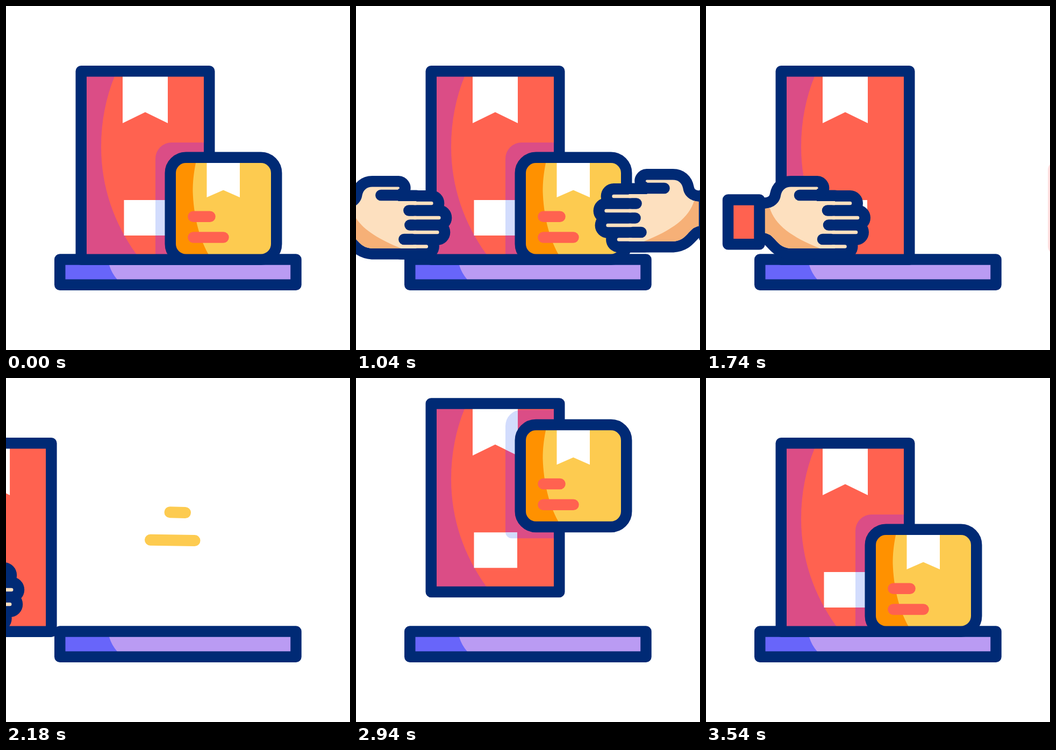
These frames come from a looping animation (640x640 px, 3600 ms). An HTML page with a canvas:

```html
<!DOCTYPE html>
<html lang="en">
<head>
<meta charset="utf-8">
<title>Parcels</title>
<style>
  html, body { margin: 0; width: 100%; height: 100%; overflow: hidden; background: #fff; }
  canvas { display: block; width: 100vw; height: 100vh; }
</style>
</head>
<body>
<canvas id="stage" width="640" height="640"></canvas>
<script>
const ctx = document.getElementById('stage').getContext('2d');
const LOOP = 3600;
const LINE = 20.5;
const C = {
  navy: '#002a75', red: '#ff6250', magenta: '#db4d86', yellow: '#fdcb50', orange: '#ff9100',
  blue: '#6865fa', lilac: '#ba9bf3', skin: '#fde0bf', tan: '#f6b077', mist: '#d2dcfd', white: '#fff'
};

const clamp = v => Math.min(1, Math.max(0, v));
const progress = (t, start, end) => clamp((t - start) / (end - start));
const smooth = (t, start, end) => {
  const u = progress(t, start, end);
  return u * u * (3 - 2 * u);
};
const dropHeight = (t, start, end) => 482 * Math.pow(1 - progress(t, start, end), 3.4);

function fill(path, color) {
  ctx.fillStyle = color;
  ctx.fill(path);
}

function stroke(path, color, width = LINE) {
  ctx.strokeStyle = color;
  ctx.lineWidth = width;
  ctx.stroke(path);
}

function bar(x1, y1, x2, y2, color, width = LINE) {
  const p = new Path2D();
  p.moveTo(x1, y1);
  p.lineTo(x2, y2);
  stroke(p, color, width);
}

function frame(x, y, w, h, r = 0) {
  const p = new Path2D();
  if (r) p.roundRect(x, y, w, h, r);
  else p.rect(x, y, w, h);
  return p;
}

function at(x, y, draw) {
  ctx.save();
  ctx.translate(x, y);
  draw();
  ctx.restore();
}

function clipped(path, draw) {
  ctx.save();
  ctx.clip(path);
  draw();
  ctx.restore();
}

const tall = {
  body: frame(139.75, 121.25, 238.5, 350.5),
  shade: new Path2D('M140 121H206L202 131C186 170 177 214 177 262C177 336 201 404 242 461L250 472H140Z'),
  paper: new Path2D('M217 125H301V218L259 197.5L217 218ZM219.5 361H300V427H219.5Z')
};
const small = {
  body: frame(305.75, 281.75, 197.5, 190, 29),
  shade: new Path2D('M306 282H355L353 292C349 312 347.5 328 347.5 345C349 388 358 428 376 461L382 472H306Z'),
  ribbon: new Path2D('M373.5 286H435V356L404.3 342.5L373.5 356Z'),
  shadow: frame(278, 254, 250, 239, [30, 30, 12, 12])
};
const shelf = {
  body: frame(100.25, 471.5, 439.25, 47.25),
  shade: new Path2D('M100 472H190L192 482C195 492 200 501 207 509L212 518H100Z')
};
const hand = {
  palm: new Path2D('M109 377C126 376 137 366 139 353C141 342 148 336.5 158 336.5H207Q211 339 206 341V363H240V451H158C140 450 134 440 126 432Q119 424 109 422Z'),
  shade: new Path2D('M100 368L118 374C128 408 160 430 212 451V460H100Z'),
  cuff: frame(41, 360.5, 58.5, 82.75),
  fingers: [[268, 367], [282, 394], [279, 421], [258.5, 447.5]],
  gaps: [[174, 352, 212], [226, 380.5, 265], [228, 407.5, 275], [217, 434, 260]]
};

function drawTall(shadowX, shadowY, hasShadow) {
  const castShadow = color => {
    if (hasShadow) at(shadowX, shadowY, () => fill(small.shadow, color));
  };
  fill(tall.body, C.red);
  clipped(tall.body, () => {
    fill(tall.shade, C.magenta);
    castShadow(C.magenta);
    fill(tall.paper, C.white);
    clipped(tall.paper, () => castShadow(C.mist));
  });
  stroke(tall.body, C.navy);
}

function drawSmall() {
  fill(small.body, C.yellow);
  clipped(small.body, () => {
    fill(small.shade, C.orange);
    fill(small.ribbon, C.white);
  });
  bar(348.5, 391.75, 379.5, 391.75, C.red);
  bar(348.5, 430.5, 404.5, 430.5, C.red);
  stroke(small.body, C.navy);
}

function drawShelf() {
  fill(shelf.body, C.lilac);
  fill(shelf.shade, C.blue);
  stroke(shelf.body, C.navy);
}

function drawHand() {
  stroke(hand.palm, C.navy, LINE * 2);
  for (const [x, y] of hand.fingers) bar(210, y, x, y, C.navy, 48);
  fill(hand.palm, C.skin);
  clipped(hand.palm, () => fill(hand.shade, C.tan));
  for (const [x, y, end] of hand.gaps) bar(x, y, end, y, C.navy);
  for (const [x, y] of hand.fingers) bar(236, y, x, y, C.skin, 6.5);
  fill(hand.cuff, C.red);
  stroke(hand.cuff, C.navy);
}

function drawDashes(t) {
  const size = smooth(t, 1980, 2080) - smooth(t, 2320, 2500);
  if (size <= 0) return;
  bar(268.5, 301.2, 268.5 + 82.5 * size, 301.2 + 1.3 * size, C.yellow, 21 * Math.sqrt(size));
  bar(305, 249.7, 305 + 28.5 * size, 249.7 + 0.8 * size, C.yellow, 21 * Math.sqrt(size));
}

function render(t) {
  ctx.fillStyle = C.white;
  ctx.fillRect(0, 0, 640, 640);
  ctx.lineCap = ctx.lineJoin = 'round';

  const pull = 350 * smooth(t, 1150, 1750);
  const leave = smooth(t, 1967, 2367);
  const returning = t >= 2500;
  const tallX = returning ? 0 : -532 * leave;
  const tallY = returning ? -dropHeight(t, 2500, 3540) : 0;
  const smallBack = t >= 2758;
  const smallShown = t < 1750 || smallBack;
  const smallX = smallBack ? 0 : pull;
  const smallY = smallBack ? -dropHeight(t, 2758, 3540) : 0;

  drawDashes(t);
  drawShelf();
  at(tallX, tallY, () => drawTall(smallX - tallX, smallY - tallY, smallShown));
  if (smallShown) at(smallX, smallY, drawSmall);
  if (t >= 1740 && t < 1980) fill(frame(636, 290, 30, 172, 18), '#ffe1e1');

  if (!returning) {
    at(-330 * (1 - smooth(t, 571, 1387)) - 492 * leave, 0, drawHand);
    at(734.5 + 269 * (1 - smooth(t, 333, 1150)) + pull, -13, () => {
      ctx.scale(-1, 1);
      drawHand();
    });
  }
}

const begin = performance.now();
function tick() {
  render((performance.now() - begin) % LOOP);
  requestAnimationFrame(tick);
}
tick();
</script>
</body>
</html>
```
